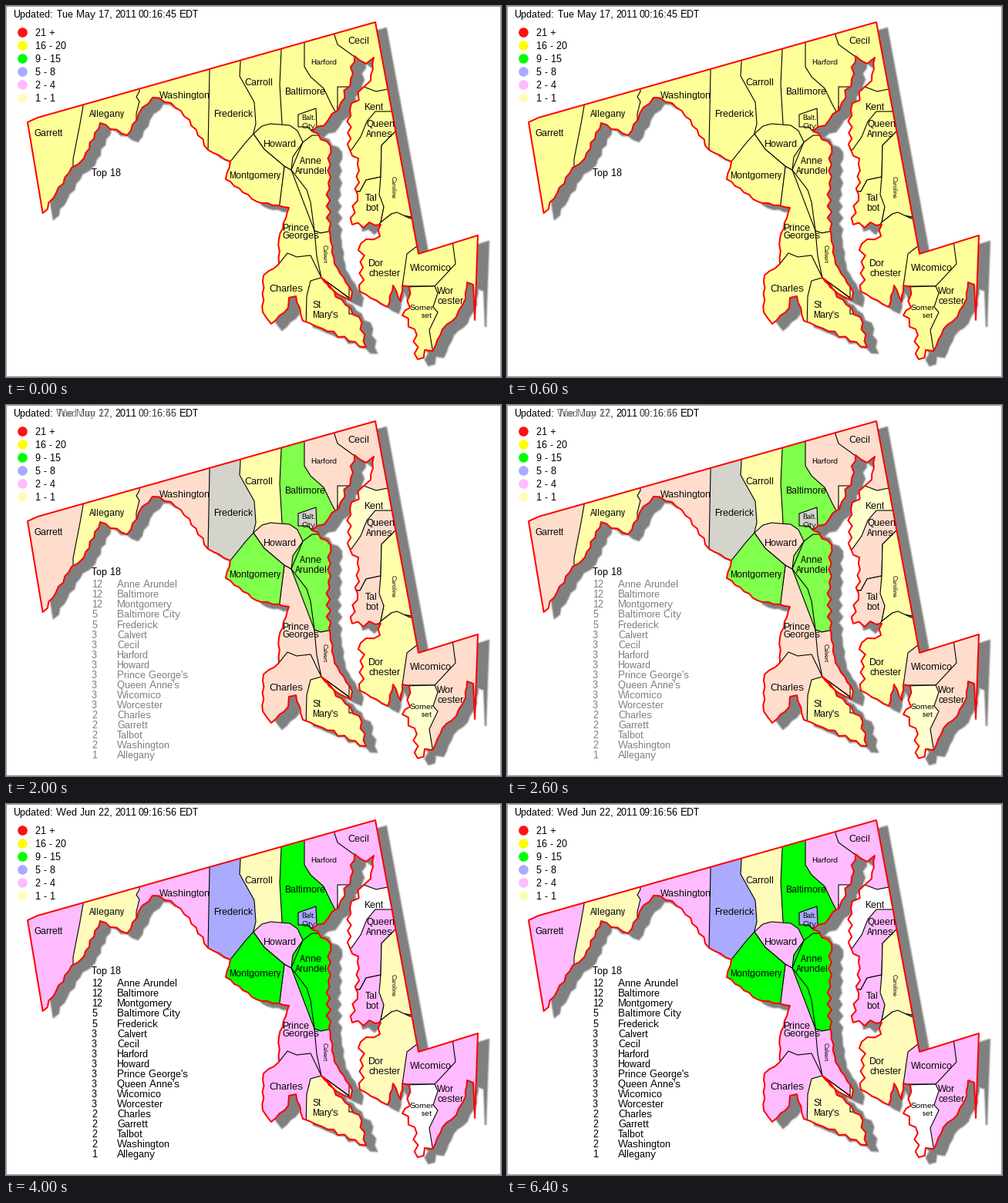
Animation of 642x482 px, one loop 8 s. Source, as a matplotlib script:

```python
import numpy as np
import matplotlib.pyplot as plt
from matplotlib.animation import FuncAnimation
from matplotlib.colors import to_rgb
from matplotlib.patches import Circle, Polygon, Rectangle

W, H, DPI = 642, 482, 100
PX = 72 / DPI
plt.rcParams.update({"font.family": "Liberation Sans", "toolbar": "None",
                     "text.hinting": "native", "text.hinting_factor": 1})
rng = np.random.default_rng(4)

START = np.array(to_rgb("#ffff99"))
# lowest count, legend text, colour
BANDS = [(21, "21 +", "#ff1111"), (16, "16 - 20", "#ffff00"),
         (9, "9 - 15", "#00ff00"), (5, "5 - 8", "#aaaaff"),
         (2, "2 - 4", "#ffbbff"), (1, "1 - 1", "#fffcbb")]

fig = plt.figure(figsize=(W / 100, H / 100), dpi=DPI, facecolor="#999999")
ax = fig.add_axes([0, 0, 1, 1])
ax.set_xlim(0, W)
ax.set_ylim(H, 0)
ax.axis("off")
ax.add_patch(Rectangle((1, 1), W - 2, H - 2, fc="white", ec="none", zorder=0))


def write(x, y, text, size=13, **kw):
    """Text whose capitals are centred on y."""
    return ax.text(x, y + 0.1 * size, text, size=size * PX, va="center",
                   zorder=6, **kw)


def shape(points, **kw):
    return ax.add_patch(Polygon(points, joinstyle="round", **kw))


def coast(swing, *points):
    """Shoreline through key points, with coves on alternating sides."""
    line = []
    for a, b in zip(np.array(points[:-1], float), np.array(points[1:], float)):
        run = b - a
        n = max(1, int(np.hypot(*run) / 7))
        normal = np.array([-run[1], run[0]]) / np.hypot(*run)
        for k in range(n):
            push = (-1) ** k * swing * rng.uniform(0.2, 1) if k else 0
            line.append(a + run * k / n + normal * push)
    return line


# State outline, clockwise from the north-west corner
land = (
    coast(0, (28, 151), (41, 145), (479, 21), (535, 322), (612, 298),
          (608, 408), (606, 362))
    + coast(1, (606, 362), (598, 359), (596, 380), (584, 404), (566, 420), (557, 441))
    + coast(4, (557, 441), (534, 459), (530, 420), (514, 402), (524, 392),
            (523, 365))
    + coast(1, (523, 365), (514, 363), (512, 384), (502, 363), (495, 391), (459, 371))
    + coast(4, (459, 371), (463, 340), (460, 309), (485, 299), (486, 284),
            (449, 284), (456, 245), (457, 198), (446, 187), (446, 135),
            (463, 106))
    + coast(1, (463, 106), (473, 97), (477, 67), (467, 75), (452, 65))
    + coast(3, (452, 65), (447, 95), (434, 126), (418, 148), (397, 163),
            (421, 182), (418, 230), (419, 290))
    + coast(1, (419, 290), (426, 335), (449, 372), (447, 382), (430, 374), (409, 353))
    + coast(3, (409, 353), (440, 388), (458, 404), (467, 443), (410, 419))
    + coast(1, (410, 419), (385, 409), (376, 377), (367, 379), (366, 392),
            (344, 413), (333, 398), (334, 350), (354, 335), (354, 302),
            (367, 262), (325, 254), (285, 225), (291, 202), (262, 187))
    + coast(2, (262, 187), (238, 148), (214, 126), (190, 119), (172, 140), (157, 168),
            (122, 152), (101, 198), (85, 210), (65, 243), (44, 276)))

# Soft shadow
cast = np.array(land) + (14, 8)
shape(cast, fc="#808080", ec="none", zorder=1)
for width, alpha in ((4.5, 0.2), (3, 0.3), (1.5, 0.5)):
    shape(cast, fill=False, ec="#808080", lw=width * PX, alpha=alpha, zorder=1)

base = shape(land, fc="none", ec="none")
shape(land, fill=False, ec="#ff0000", lw=2 * PX, zorder=5)
counts, fills = {}, []


def county(name, count, x, y, points, label=None, size=11.7, **kw):
    """One county trimmed to the outline; later ones cover earlier ones."""
    patch = shape(points, fc=START, ec="black", lw=1.1 * PX, zorder=3)
    patch.set_clip_path(base)
    colour = next((c for low, _, c in BANDS if count >= low), "#ffffff")
    fills.append((patch, np.array(to_rgb(colour))))
    counts[name] = count
    write(x, y, label or name, size, **kw)


def west(*border):
    """Everything to the left of a border that runs from north to south."""
    (top, _), (foot, _) = border[0], border[-1]
    return [(0, 0), (top, 0), *border, (foot, 300), (0, 300)]


# Northern row, each laid over its eastern neighbour
county("Cecil", 3, 443, 44, [(0, 0), (W, 0), (W, 130), (0, 130)])
county("Harford", 3, 395, 72, west((426, 38), (430, 50), (452, 66)), size=10)
county("Baltimore", 12, 361, 110,
       west((387, 49), (387, 79), (395, 92), (412, 107), (422, 128), (434, 150)))
county("Carroll", 1, 309, 98, west((357, 57), (355, 102), (358, 153)))
county("Frederick", 5, 269, 139,
       west((304, 73), (303, 91), (322, 125), (324, 153), (321, 165)))
county("Washington", 2, 199, 115, west((264, 85), (262, 187)))
county("Allegany", 1, 108, 139, west((173, 111), (169, 118), (173, 124), (169, 140)))
county("Garrett", 2, 36, 164, west((100, 130), (96, 153), (87, 199)))
county("Baltimore City", 5, 383, 150,
       [(379, 141), (402, 133), (403, 158), (396, 162), (391, 157), (379, 157)],
       "Balt.\nCity", 8.7)

# Centre and south
county("Prince George's", 3, 358, 292,
       [(361, 208), (370, 213), (400, 292), (409, 353), (330, 353), (330, 262),
        (354, 261)], "Prince\nGeorges", linespacing=0.9)
county("Montgomery", 12, 289, 219,
       [(321, 166), (335, 186), (361, 208), (354, 265), (270, 265), (270, 205),
        (291, 202), (311, 177)])
county("Anne Arundel", 12, 375, 206.5,
       [(385, 177), (397, 168), (434, 168), (434, 291), (408, 295), (400, 292),
        (395, 255), (390, 239), (370, 213)], "  Anne\nArundel")
county("Howard", 3, 334, 178,
       [(321, 166), (332, 156), (343, 153), (368, 155), (378, 162), (385, 177),
        (372, 196), (370, 213), (361, 208), (335, 186)])
county("Calvert", 3, 409, 321.5,
       [(400, 292), (408, 295), (434, 290), (456, 345), (456, 387), (409, 353),
        (403, 325)], size=8, rotation=-90)
county("Charles", 2, 341, 366,
       [(354, 335), (365, 321), (377, 326), (395, 324), (409, 353), (393, 365),
        (390, 425), (320, 425), (320, 335)])
county("St. Mary's", 1, 397, 394,
       [(409, 353), (395, 357), (390, 377), (388, 460), (480, 460), (470, 398)],
       "St\nMary's")

# Eastern shore
county("Queen Anne's", 3, 467, 158.5,
       [(430, 130), (515, 130), (515, 163), (505, 163), (487, 181), (486, 222),
        (467, 226), (459, 241), (430, 241)], "Queen\nAnnes")
county("Kent", 0, 464, 130,
       [(430, 105), (464, 105), (480, 111), (515, 104), (515, 137), (479, 137),
        (468, 150), (460, 170), (448, 187), (430, 187)])
county("Talbot", 2, 466, 254.5,
       [(430, 241), (459, 241), (467, 226), (486, 222), (490, 261), (486, 281),
        (478, 292), (430, 292)], "Tal\nbot")
county("Caroline", 1, 498, 234.5,
       [(505, 163), (540, 163), (540, 276), (500, 270), (486, 281), (490, 261),
        (484, 245), (486, 222), (487, 181)], size=8.4, rotation=-90)
county("Dorchester", 1, 470, 339.5,
       [(486, 281), (500, 270), (507, 268), (524, 276), (560, 276), (560, 322),
        (513, 400), (445, 400), (445, 296), (478, 292)], "Dor\nchester")
county("Worcester", 3, 559, 375.5,
       [(577, 280), (630, 280), (630, 470), (540, 470), (540, 364)], "Wor\ncester")
county("Wicomico", 3, 524, 339,
       [(533, 312), (520, 322), (514, 364), (556, 364), (583, 335), (577, 290)])
county("Somerset", 0, 524, 396.5,
       [(514, 365), (556, 364), (560, 373), (554, 391), (560, 398), (549, 421),
        (557, 470), (500, 470), (500, 388), (514, 388)], "Somer\n     set", 9.7)

for i, (_, text, colour) in enumerate(BANDS):
    y = 34.5 + 17 * i
    ax.add_patch(Circle((21.5, y), 6.3, fc=colour, ec="none"))
    write(38, y, text)

for x, text in ((9, "Updated:"), (141, "2011"), (225, "EDT")):
    write(x, 10.5, text)
before = [write(66, 10.5, "Tue May 17,"), write(172, 10.5, "00:16:45")]
after = [write(65, 10.5, "Wed Jun 22,"), write(172, 10.5, "09:16:56")]

write(111, 216.5, "Top 18")
ranking = sorted(counts, key=lambda name: (-counts[name], name))[:18]
for i, name in enumerate(ranking):
    y = 232.5 + 13.05 * i
    after += [write(111, y, str(counts[name])), write(144, y, name)]


def update(i):
    p = min(i / 4, 1)
    for patch, colour in fills:
        patch.set_facecolor((1 - p) * START + p * colour)
    for text in before:
        text.set_alpha(1 - p)
    for text in after:
        text.set_alpha(p)
    return []


anim = FuncAnimation(fig, update, frames=8, interval=1000, repeat=True,
                     repeat_delay=0, init_func=lambda: update(0))
plt.show()
```
